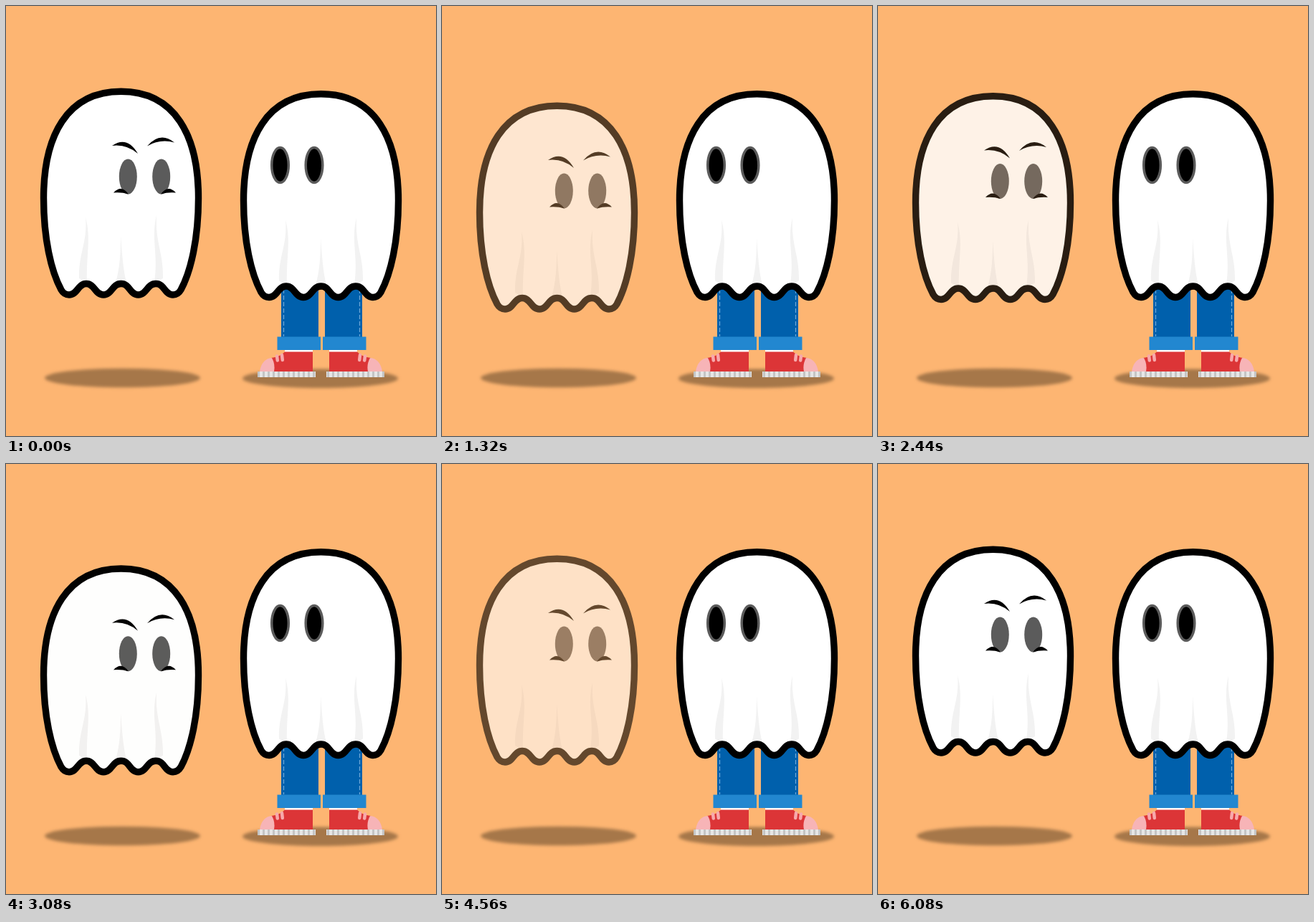
An HTML page for the animation above (6.16 s loop, 600 by 600 pixels).

```html
<!DOCTYPE html>
<html lang="en">
<head>
<meta charset="utf-8">
<title>Two ghosts</title>
<style>
  html, body { margin: 0; height: 100%; overflow: hidden; background: #fdb572; }
  svg { display: block; width: 100vw; height: 100vh; }
</style>
</head>
<body>
<svg viewBox="0 0 600 600">
  <defs>
    <filter id="soft" x="-10%" y="-40%" width="120%" height="180%">
      <feGaussianBlur stdDeviation="2.3"/>
    </filter>
    <pattern id="ridges" x="351" width="7" height="8" patternUnits="userSpaceOnUse">
      <path fill="#e6e6e6" d="M0 0h7v8h-7z"/>
      <path fill="#c4c4c4" d="M0 0h3v8h-3z"/>
    </pattern>
    <g id="sheet">
      <path id="outline" fill="#fff" d="M160.5 119.3C85 119.3 52.5 181 52.5 268C52.5 325 63 370 77 396
        Q81 403 88 403c12 0 12-15.5 24-15.5s12 15.5 24 15.5s12-15.5 24.5-15.5s12 15.5 24 15.5
        s12-15.5 24.5-15.5s12 15.5 24 15.5Q240 403 244 396C258 370 268.5 325 268.5 268
        C268.5 181 236 119.3 160.5 119.3z"/>
      <g fill="#f2f2f2">
        <path d="M111 295C119 325 112 345 113 386L102 380C101 345 114 330 111 295z"/>
        <path d="M160 320C162 345 163 365 168 386H153C159 365 160 345 160 320z"/>
        <path d="M210 292C202 325 213 345 207 386L219 380C220 345 208 330 210 292z"/>
      </g>
      <use href="#rim"/>
    </g>
    <path id="rim" fill="none" stroke="#000" stroke-width="9.4" stroke-linejoin="round"/>
    <g id="jeans">
      <path fill="#0060ac" d="M384 390h52v73h-52z"/>
      <path stroke="#6fa9d9" stroke-width="1.2" stroke-dasharray="6 3" d="M387.5 395V461"/>
      <path fill="#2287d0" d="M378.500 461.500h60.500v18.500h-60.500z"/>
    </g>
    <g id="shoe">
      <path fill="#fff" d="M389 480h39v3h-39z"/>
      <path fill="#dc3537" d="M428 482.500V510H368L370 491Q382 490 389 482.500z"/>
      <path fill="#f7b4b7" d="M354 510Q357 492 371 491Q376 500 374 510z"/>
      <path stroke="#f7a9ab" stroke-width="4.500" stroke-linecap="round" d="M378 488.500l.8 6M385 487l.8 7"/>
      <path fill="url(#ridges)" d="M351 510h81v8h-81z"/>
    </g>
  </defs>

  <rect width="600" height="600" fill="#fdb572"/>
  <g fill="#a6774a" filter="url(#soft)">
    <ellipse cx="162.500" cy="519" rx="108.500" ry="13.300"/>
    <ellipse cx="438.500" cy="519.700" rx="108.500" ry="13.300"/>
  </g>

  <use href="#jeans"/>
  <use href="#jeans" transform="translate(881) scale(-1 1)"/>
  <use href="#shoe"/>
  <use href="#shoe" transform="translate(879) scale(-1 1)"/>
  <use href="#sheet" transform="translate(279 3.500)"/>
  <g stroke="#5b5b5b" stroke-width="3.500">
    <ellipse cx="382.500" cy="222" rx="11.800" ry="24.500"/>
    <ellipse cx="430" cy="222" rx="11.800" ry="24.500"/>
  </g>

  <g id="ghost">
    <use href="#sheet"/>
    <g fill="#5b5b5b">
      <ellipse cx="170.300" cy="238" rx="12.500" ry="24.500"/>
      <ellipse cx="216.700" cy="238" rx="12.500" ry="24.500"/>
    </g>
    <path d="M148 195Q169 180.500 184 206Q168 192.500 148 195z
      M197 195.500Q215 174.500 235 190.500Q215 185 197 195.500z
      M150 260.500Q161 248.500 171 262.500Q161 259.500 150 260.500z
      M216 262.500Q226 248.500 237 260.500Q226 259.500 216 262.500z"/>
  </g>
</svg>
<script>
  const byId = id => document.getElementById(id);
  const ghost = byId('ghost');
  byId('rim').setAttribute('d', byId('outline').getAttribute('d'));

  const LOOP = 6160, LAST = 6080, STEP = 40;
  // Turning points: [ms, value]
  const hover = [[0, 0], [1090, 25.2], [1974, -8], [3022, 27], [4000, -8.7], [5040, 30], [LAST, 0]];
  const fade = [[0, 1], [1590, 0.6], [3040, 1], [4560, 0.6], [LAST, 1]];

  const linear = u => u;
  const sine = u => (1 - Math.cos(Math.PI * u)) / 2;

  function valueAt(turns, t, ease) {
    const i = Math.max(1, turns.findIndex(turn => t <= turn[0]));
    const [t0, v0] = turns[i - 1], [t1, v1] = turns[i];
    return v0 + (v1 - v0) * ease((t - t0) / (t1 - t0));
  }

  function draw(now) {
    const t = Math.min(LAST, Math.floor(now % LOOP / STEP) * STEP);
    ghost.setAttribute('transform', `translate(0 ${valueAt(hover, t, sine).toFixed(2)})`);
    ghost.setAttribute('opacity', valueAt(fade, t, linear).toFixed(3));
    requestAnimationFrame(draw);
  }
  draw(performance.now());
</script>
</body>
</html>
```
